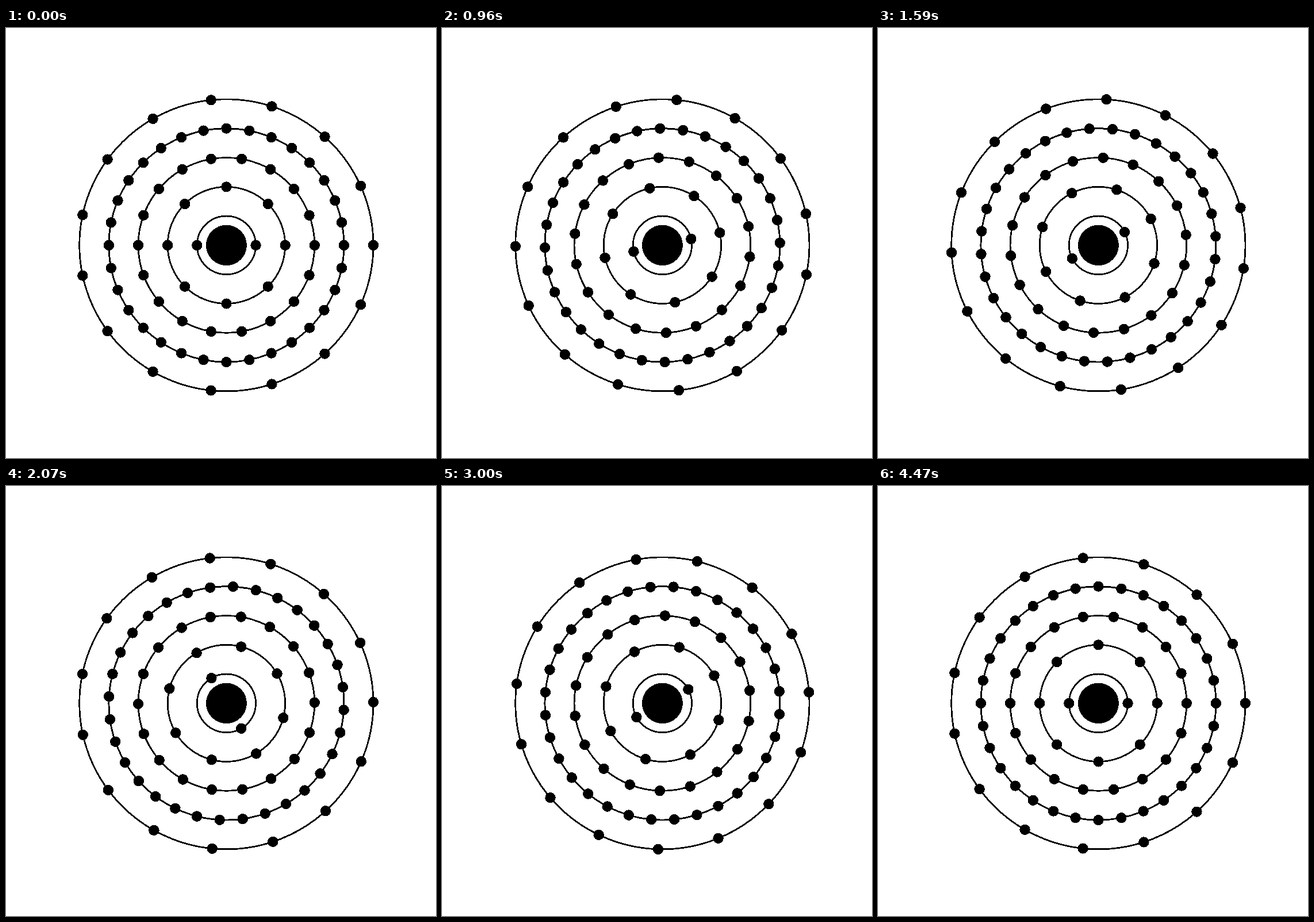
Recreate the animation shown at these times as an HTML page. Size 748x748 px, loop 4500 ms.

```html
<!DOCTYPE html>
<html lang="en">
<head>
<meta charset="utf-8">
<title>Electron shells</title>
<style>
  html, body { margin: 0; height: 100%; overflow: hidden; background: #fff; }
  svg { display: block; width: 100vw; height: 100vh; }
</style>
</head>
<body>
<svg viewBox="0 0 748 748" shape-rendering="crispEdges">
  <g transform="translate(383.4 377.9) scale(1 .9935)">
    <circle r="35.5"/>
    <g id="rings" fill="none" stroke="#000" stroke-width="2.8"></g>
    <g id="electrons"></g>
  </g>
</svg>
<script>
const SHELLS = [2, 8, 18, 32, 15];
const SPACING = 51.13;
const STEP_MS = 30;
const STEPS = 150;
const TOTAL_TURN = 765;

const rings = document.getElementById('rings');
const electrons = document.getElementById('electrons');

function addCircle(parent, cx, cy, r) {
  const circle = document.createElementNS('http://www.w3.org/2000/svg', 'circle');
  for (const [name, value] of Object.entries({ cx, cy, r })) circle.setAttribute(name, value);
  parent.append(circle);
}

SHELLS.forEach((count, i) => {
  const radius = SPACING * (i + 1);
  addCircle(rings, 0, 0, radius);
  for (let j = 0; j < count; j++) {
    const angle = 2 * Math.PI * j / count;
    addCircle(electrons, radius * Math.cos(angle), radius * Math.sin(angle), 9.2);
  }
});

// Rests for one step, then spins clockwise with a cubic slowdown.
function draw(now) {
  const step = Math.floor(now / STEP_MS) % STEPS;
  const remaining = step ? 1 - step / STEPS : 0;
  electrons.setAttribute('transform', `rotate(${-TOTAL_TURN * remaining ** 3})`);
}

let start;
function tick(now) {
  start ??= now;
  draw(now - start);
  requestAnimationFrame(tick);
}
draw(0);
requestAnimationFrame(tick);
</script>
</body>
</html>
```
